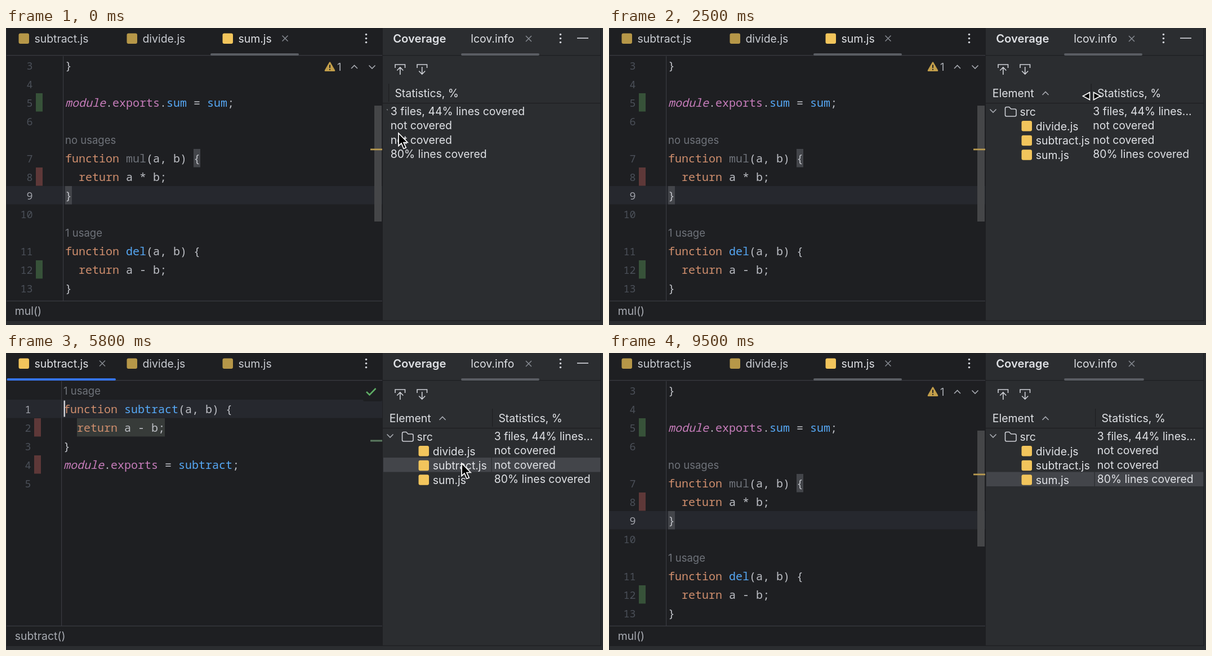
Recreate the animation shown at these times as an HTML page with a canvas. Size 1060 by 528 pixels, loop 9700 ms.

```html
<!DOCTYPE html>
<html lang="en">
<head>
<meta charset="utf-8">
<title>Coverage tool window</title>
<style>
  html, body { margin: 0; width: 100%; height: 100%; overflow: hidden; background: #1e1f22; }
  canvas { display: block; }
</style>
</head>
<body>
<canvas id="stage" width="1060" height="528"></canvas>
<script>
const ctx = document.getElementById('stage').getContext('2d');
const LOOP = 9700, STEP = 100, ROW = 33, CHAR = 12, TREE_ROW = 25.6;
const UI = '19.4px Inter, sans-serif';
const MONO = '20px "Noto Sans Mono", monospace';
const EDITOR = '#1e1f22', PANEL = '#2b2d30', TEXT = '#dfe1e5', ICON = '#ced0d6';
const BLUE = '#3574f0', GRAY = '#5a5d63', YELLOW = '#f2c55c';
const INK = { k: '#cf8e6d', f: '#56a8f5', t: '#bcbec4', p: '#c77dbb', m: '#c77dbb', u: '#6f737a' };

// Code rows are colour-keyed segments; rows starting with # are usage hints.
const views = {
  sum: {
    x: 105, first: 3, current: 7, crumb: 'mul()', caret: [116, 7],
    marks: { 2: '#375239', 6: '#5e3838', 11: '#375239' },
    boxes: [[19, 5, 1, '#43454a'], [0, 7, 1, '#43454a']],
    rows: ['t:}', '', 'm:module|t:.|p:exports|t:.|f:sum|t: = |f:sum|t:;', '', '#no usages',
      'k:function |u:mul|t:(a, b) {', 'k:  return |t:a * b;', 't:}', '', '#1 usage',
      'k:function |f:del|t:(a, b) {', 'k:  return |t:a - b;', 't:}']
  },
  divide: {
    x: 102, first: 1, current: 1, crumb: 'divide()', caret: [209.5, 1],
    marks: { 2: '#5e3838', 5: '#5e3838' }, stripes: [118.5, 240],
    boxes: [[9, 1, 6, '#373b39'], [17, 5, 6, '#373b39']],
    rows: ['#1 usage', 'k:function |f:divide|t:(a, b) {', 'k:  return |t:a / b;', 't:}', '',
      'm:module|t:.|p:exports|t: = |f:divide|t:;', '', '']
  },
  subtract: {
    x: 102, first: 1, current: 1, crumb: 'subtract()', caret: [102.5, 1],
    marks: { 2: '#5e3838', 4: '#5e3838' }, stripes: [154.5],
    boxes: [[2, 2, 13, '#373b39']],
    rows: ['#1 usage', 'k:function |f:subtract|t:(a, b) {', 'k:  return |t:a - b;', 't:}',
      'm:module|t:.|p:exports|t: = |f:subtract|t:;', '']
  }
};
const tabs = [
  { name: 'subtract', x: 22.5, close: 171, from: 1.5, to: 195 },
  { name: 'divide', x: 214.5, close: 341, from: 194, to: 365 },
  { name: 'sum', x: 384.5, close: 495.5, from: 363, to: 520 }
];
const pointerPath = [[300, 697, 187], [700, 656, 284], [1300, 680, 118], [1400, 680, 119],
  [2000, 792.5, 120], [2400, 853, 121], [2600, 860, 121], [2900, 867, 121], [3100, 867, 121],
  [3300, 870, 143], [3400, 870, 143], [3600, 812, 171], [3900, 807, 171], [4700, 807, 171],
  [5200, 809, 196], [6400, 809, 196], [6800, 803, 232], [8300, 803, 232], [8900, 656, 284]];
const dividerPath = [[1400, 679.5], [2000, 799.5], [2400, 850], [2500, 856], [2600, 857], [2900, 863.5]];

function follow(path, t) {
  let i = path.findIndex(p => p[0] >= t);
  if (i < 0) i = path.length - 1;
  const b = path[i], a = path[Math.max(0, i - 1)];
  const k = b === a ? 0 : Math.min(1, (t - a[0]) / (b[0] - a[0]));
  return a.slice(1).map((v, j) => v + (b[j + 1] - v) * k);
}
function rect(x, y, w, h, color, r = 0) {
  ctx.fillStyle = color;
  ctx.beginPath();
  ctx.roundRect(x, y, w, h, r);
  ctx.fill();
}
function text(s, x, y, color = TEXT, font = UI, align = 'left') {
  ctx.font = font;
  ctx.fillStyle = color;
  ctx.textAlign = align;
  ctx.fillText(s, x, y);
}
function stroke(path, color = ICON, width = 1.6) {
  ctx.strokeStyle = color;
  ctx.lineWidth = width;
  ctx.stroke(new Path2D(path));
}
function dots(x) {
  for (const y of [11.5, 18.5, 25.5]) rect(x - 1.8, y - 1.8, 3.6, 3.6, ICON, 1.8);
}
const cross = (x, y) => stroke(`M${x - 5} ${y - 5}l10 10m0 -10l-10 10`, '#868a91', 1.5);
const underline = (from, to, focused) => rect(from, 45, to - from, 4, focused ? BLUE : GRAY, 2);

function drawEditor(view, caretOn, bulbOn) {
  const { x } = view, gutter = x - 3.5, rowTop = r => 50 + ROW * r;
  rect(1, rowTop(view.current), 667, ROW - 0.5, '#26282e');
  rect(gutter - 0.5, 50, 1.2, 435, '#393b40');
  for (const [row, color] of Object.entries(view.marks)) rect(x - 52, rowTop(+row), 12, ROW - 0.5, color);
  for (const [col, row, len, color] of view.boxes) {
    rect(x + col * CHAR, rowTop(row), len * CHAR, ROW - 0.5, color);
  }
  let number = view.first;
  view.rows.forEach((row, r) => {
    const y = rowTop(r);
    if (row[0] === '#') return text(row.slice(1), x, y + 24, '#6f737a', '18.5px Inter, sans-serif');
    text(number++, x - 57.5, y + 23.5, r === view.current ? '#a1a3ab' : '#4b5059',
      '18.4px "Noto Sans Mono", monospace', 'right');
    let at = x;
    for (const part of row ? row.split('|') : []) {
      const s = part.slice(2);
      text(s, at, y + 23.5, INK[part[0]], (part[0] === 'm' ? 'italic ' : '') + MONO);
      at += s.length * CHAR;
    }
  });
  if (caretOn) rect(view.caret[0], rowTop(view.caret[1]) + 1.5, 2.5, 29, ICON);
  if (bulbOn) {
    rect(115.5, 125, 15, 15, YELLOW, 7.5);
    rect(119.5, 136, 7, 5, YELLOW);
    rect(119, 142, 8, 1.6, ICON);
    rect(120, 145.2, 6, 1.6, ICON);
  }
  if (view.stripes) {
    rect(634, 50, 34, 36, EDITOR, 3);
    stroke('M640 69l5.5 5.5l11 -11.5', '#5fad65', 2.6);
    for (const y of view.stripes) rect(647, y, 21, 3, '#5b7a60');
  } else {
    ctx.fillStyle = '#c29e4a';
    ctx.fill(new Path2D('M573.6 61.5q1.4 -2.4 2.8 0l7.6 13.2q1 2.3 -1.5 2.3h-15q-2.5 0 -1.5 -2.3z'));
    rect(574, 65.5, 2, 5.5, EDITOR);
    rect(574, 72.7, 2, 2, EDITOR);
    text('1', 588, 75.5, '#a8abb2', '18.5px Inter, sans-serif');
    stroke('M613 72l5.5 -5.5l5.5 5.5M644.5 66.5l5.5 5.5l5.5 -5.5', '#a8abb2');
    rect(654, 138, 13, 206, '#454648');
    rect(647, 214.5, 21, 2.8, '#b99a50');
  }
  rect(1, 484.8, 667, 1.2, '#393b40');
  text(view.crumb, 15.8, 510, '#a8abb2');
}

function drawTabs(active, focused) {
  rect(1, 48, 667, 1.2, '#393b40');
  for (const tab of tabs) {
    const on = tab.name === active;
    rect(tab.x, 9.5, 18.5, 18.5, on ? YELLOW : '#b69748', 3);
    text(tab.name + '.js', tab.x + 28, 25.7, on ? TEXT : '#c9ccd2');
    if (on) {
      cross(tab.close, 18.5);
      underline(tab.from, tab.to, focused);
    }
  }
  dots(639.5);
}

function ellipsize(s, width) {
  ctx.font = UI;
  if (ctx.measureText(s).width <= width) return s;
  while (s && ctx.measureText(s + '...').width > width) s = s.slice(0, -1);
  return s.trimEnd() + '...';
}

function drawPanel({ divider, selected, rowFocused, focused, hovered, dragging }) {
  rect(669, 0, 391, 528, PANEL);
  rect(669, 48, 387, 1.2, EDITOR);
  rect(669, 133, 387, 1.2, EDITOR);
  text('Coverage', 687.2, 25.6, TEXT, '600 20.2px Inter, sans-serif');
  text('lcov.info', 825.3, 25.7);
  cross(928, 19);
  underline(808, hovered ? 947 : 950, focused);
  if (hovered) {
    dots(984.5);
    rect(1014, 17.2, 20, 1.7, ICON);
  }
  stroke('M691 71v-6h17.5v6M699.8 83v-13m-5.5 5.5l5.5 -5.5l5.5 5.5');
  stroke('M730 71v-6h17.5v6M738.7 69v13m-5.5 -5.5l5.5 5.5l5.5 -5.5');

  if (selected > 0) {
    const y = 135 + 25.5 * selected;
    rect(670, y, 386, 25.5, rowFocused ? '#2e436e' : '#43454a');
    rect(861.5, y, 1.2, 25.5, PANEL);
  }

  ctx.save();
  ctx.beginPath();
  ctx.rect(670, 100, divider - 672, 419);
  ctx.clip();
  text('Element', 680.8, 123);
  stroke('M769.5 119l5.5 -5.5l5.5 5.5', '#a8abb2');
  stroke('M676.5 144.5l5.5 5.5l5.5 -5.5', '#a8abb2');
  stroke('M703.5 143q0 -2.5 2.5 -2.5h4.5l3.5 3.5h6.5q2.5 0 2.5 2.5v8q0 2.5 -2.5 2.5h-14.5q-2.5 0 -2.5 -2.5z');
  text('src', 729.5, 156);
  ['divide', 'subtract', 'sum'].forEach((name, i) => {
    const y = 156 + TREE_ROW * (i + 1);
    rect(732.5, y - 16.5, 18.5, 18.5, YELLOW, 3);
    text(name + '.js', 757.7, y);
  });
  ctx.restore();

  rect(divider - 0.5, 99, 1.2, 32, EDITOR);
  text('Statistics, %', divider + 10.9, 123);
  ['3 files, 44% lines covered', 'not covered', 'not covered', '80% lines covered'].forEach((s, i) =>
    text(ellipsize(s, 1040 - divider), divider + 3.3, 154.5 + TREE_ROW * i));

  if (dragging) rect(671, 507, (divider - 670) ** 2 / 203, 12, '#4d4e51');
  rect(669, 519.8, 387, 1.2, EDITOR);
  rect(1055.5, 0, 1.3, 521, EDITOR);
}

function drawPointer(x, y, resizing) {
  const shape = new Path2D(resizing
    ? 'M-15 0l12 -6.5v13zM4 -6.5v13l12 -6.5z'
    : 'M0 0v22.5l5 -4.5l4 9.5l4.2 -1.8l-4.2 -9.2h7z');
  ctx.save();
  ctx.translate(x, y);
  ctx.fillStyle = '#000';
  ctx.strokeStyle = '#fff';
  ctx.lineWidth = 1.7;
  ctx.fill(shape);
  ctx.stroke(shape);
  ctx.restore();
}

function draw(t) {
  const during = (...spans) => spans.some(([a, b]) => t >= a && t < b);
  const active = during([4200, 5800]) ? 'divide' : during([5800, 7500]) ? 'subtract' : 'sum';
  const [px, py] = follow(pointerPath, t);
  const pointerOn = t < 9000;

  rect(0, 0, 1060, 528, EDITOR);
  rect(0, 0, 1, 528, PANEL);
  rect(0, 521, 1060, 7, PANEL);
  drawEditor(views[active],
    during([4200, 4800], [5800, 6500], [7500, 8400], [9000, 9500]),
    during([5000, 5800], [6700, 7500]));
  drawTabs(active, during([4200, 5300], [5800, 7000], [7500, 9500]));
  drawPanel({
    divider: follow(dividerPath, t)[0],
    selected: t < 4000 ? 0 : t < 5300 ? 1 : t < 7000 ? 2 : 3,
    rowFocused: during([4000, 4200], [5300, 5800], [7000, 7500]),
    focused: during([4000, 4300], [5500, 5800], [7300, 7500]),
    hovered: pointerOn && px > 669,
    dragging: during([1500, 2500])
  });
  if (pointerOn) drawPointer(px, py, during([1200, 3200]));
}

function tick(now) {
  draw(Math.floor(now % LOOP / STEP) * STEP);
  requestAnimationFrame(tick);
}
requestAnimationFrame(tick);
</script>
</body>
</html>
```
